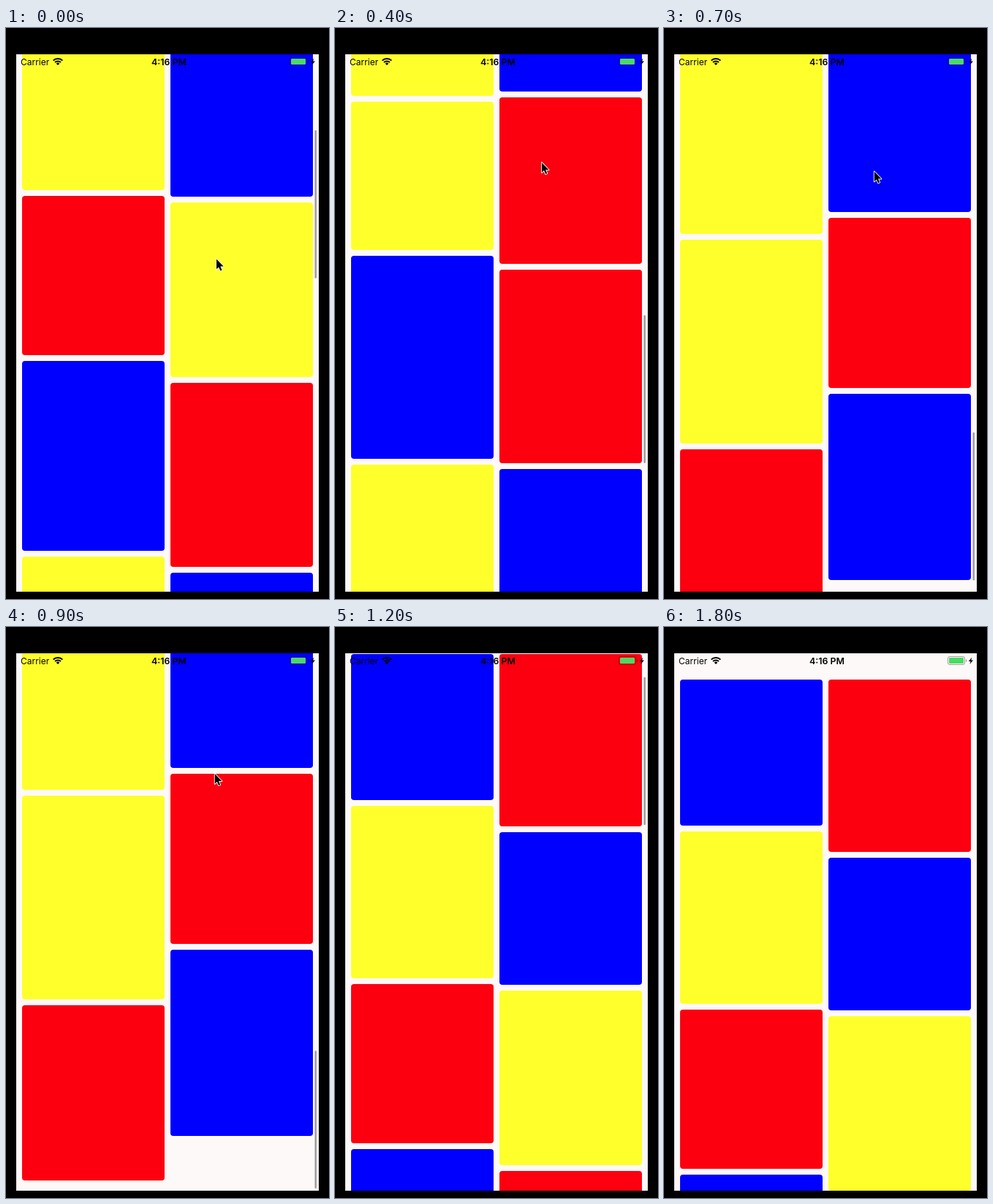
Animation of 442 by 782 pixels, one loop 2000 ms. Source, as an HTML page with a canvas:

```html
<!DOCTYPE html>
<html lang="en">
<head>
<meta charset="utf-8">
<title>Two-column scroll</title>
<style>
  html, body { margin: 0; width: 100%; height: 100%; overflow: hidden; background: #000; }
  canvas { display: block; }
</style>
</head>
<body>
<canvas id="stage" width="442" height="782"></canvas>
<script>
const ctx = document.getElementById('stage').getContext('2d');

const LOOP = 2000, STEP = 100;
const SCREEN = { x: 14, y: 36, w: 414, h: 736 };
const FILLS = ['#0000ff', '#fc0010', '#ffff2b'];
const CELL = { top: 72, width: 195, gap: 8, radius: 4 };
const HEIGHTS = [200, 236, 236, 209, 218, 239, 260, 252, 288, 260,
  228, 203, 278, 265, 268, 232, 233, 279, 255, 240];
const BAR = { x: 422.5, width: 2.5, top: 59, bottom: 769 };
const TURN = 900, RETURN_TIME = 347.7;

// Masonry: each cell joins the shorter column, and the colours take turns.
const columnEnds = [CELL.top, CELL.top];
const cells = HEIGHTS.map((h, i) => {
  const column = columnEnds[0] <= columnEnds[1] ? 0 : 1;
  const x = SCREEN.x + CELL.gap + column * (CELL.width + CELL.gap);
  const y = columnEnds[column];
  columnEnds[column] += h + CELL.gap;
  return { x, y, h, fill: FILLS[i % FILLS.length] };
});
const contentHeight = Math.max(...columnEnds) - CELL.gap - SCREEN.y;
const maxScroll = contentHeight - SCREEN.h;
const barLength = (BAR.bottom - BAR.top) * SCREEN.h / contentHeight;

// Smooth polynomial through a few [time, value] points.
function curve(points, t) {
  return points.reduce((sum, [ti, v]) => sum + points.reduce(
    (weight, [tj]) => tj === ti ? weight : weight * (t - tj) / (ti - tj), v), 0);
}

function scrollAt(t) {
  const swipe = curve([[0, 294], [200, 712], [500, 1449], [TURN, 1856]], Math.min(t, TURN));
  const left = 1 - (t - TURN) / RETURN_TIME;
  return t <= TURN ? swipe : swipe * Math.max(0, left) ** 2;
}

function pointerAt(t) {
  return [
    curve([[0, 288], [200, 281.7], [500, 284.7], [TURN, 285.7]], t),
    curve([[0, 316.5], [200, 216.5], [500, 184], [TURN, 201]], t)
  ];
}

function fillBox(x, y, w, h, r) {
  ctx.beginPath();
  ctx.roundRect(x, y, w, h, r);
  ctx.fill();
}

function polygon(points) {
  ctx.beginPath();
  points.forEach(([x, y]) => ctx.lineTo(x, y));
  ctx.closePath();
}

function drawCells(scroll) {
  for (const { x, y, h, fill } of cells) {
    ctx.fillStyle = fill;
    fillBox(x, y - scroll, CELL.width, h, CELL.radius);
  }
}

function drawScrollBar(scroll, alpha) {
  // The bar shrinks against the bottom while the list is pulled past its end.
  const length = barLength - Math.max(0, scroll - maxScroll);
  const progress = Math.min(1, scroll / maxScroll);
  const top = BAR.top + (BAR.bottom - BAR.top - length) * progress;
  ctx.fillStyle = `rgba(0, 0, 0, ${0.37 * alpha})`;
  fillBox(BAR.x, top, BAR.width, length, 1.25);
}

function drawWifi(x, y) {
  const from = -Math.PI * 3 / 4, to = -Math.PI / 4;
  for (let ring = 0; ring < 3; ring++) {
    const outer = 3.2 + ring * 3.4;
    ctx.beginPath();
    ctx.arc(x, y, outer, from, to);
    ctx.arc(x, y, ring ? outer - 2 : 0, to, from, true);
    ctx.fill();
  }
}

function drawBattery() {
  ctx.strokeStyle = ctx.fillStyle = 'rgba(0, 0, 0, 0.36)';
  ctx.lineWidth = 1;
  ctx.beginPath();
  ctx.roundRect(388.5, 40.5, 23, 11, 2.5);
  ctx.stroke();
  fillBox(413, 44.3, 1.3, 3.6, [0, 1.3, 1.3, 0]);
  ctx.fillStyle = '#4cd964';
  fillBox(390, 42, 20, 8, 1.3);
  ctx.fillStyle = '#000';
  polygon([[421.4, 41.6], [416.8, 47], [419.6, 47], [418.4, 51], [423, 45.4], [420.2, 45.4]]);
  ctx.fill();
}

function drawStatus() {
  ctx.fillStyle = '#000';
  ctx.font = '400 12px Inter, sans-serif';
  ctx.fillText('Carrier', 20, 51);
  ctx.font = '600 12.4px Inter, sans-serif';
  ctx.fillText('4:16 PM', 199, 51);
  drawWifi(71, 51);
  drawBattery();
}

function drawPointer([x, y]) {
  ctx.save();
  ctx.translate(x, y);
  polygon([[0, 0], [0, 13.8], [3.1, 10.9], [5.4, 15.9], [7.5, 15], [5.3, 10.1], [9.7, 10.1]]);
  ctx.lineJoin = 'round';
  ctx.strokeStyle = '#fff';
  ctx.lineWidth = 1.8;
  ctx.stroke();
  ctx.fillStyle = '#000';
  ctx.fill();
  ctx.restore();
}

function draw(time) {
  const t = Math.floor(time / STEP) * STEP;
  const scroll = scrollAt(t);
  const barAlpha = Math.min(1, Math.max(0, (1800 - t) / 400));

  ctx.fillStyle = '#000';
  ctx.fillRect(0, 0, 442, 782);
  ctx.save();
  ctx.beginPath();
  ctx.rect(SCREEN.x, SCREEN.y, SCREEN.w, SCREEN.h);
  ctx.clip();
  ctx.fillStyle = '#fdf9f8';
  ctx.fillRect(SCREEN.x, SCREEN.y, SCREEN.w, SCREEN.h);
  drawCells(Math.round(scroll));
  drawScrollBar(scroll, barAlpha);
  drawStatus();
  if (t <= TURN) drawPointer(pointerAt(t));
  else if (t >= 1400 && t < 1600) drawPointer([221, 161]);
  ctx.restore();
}

const start = performance.now();
function tick() {
  draw((performance.now() - start) % LOOP);
  requestAnimationFrame(tick);
}
tick();
</script>
</body>
</html>
```
